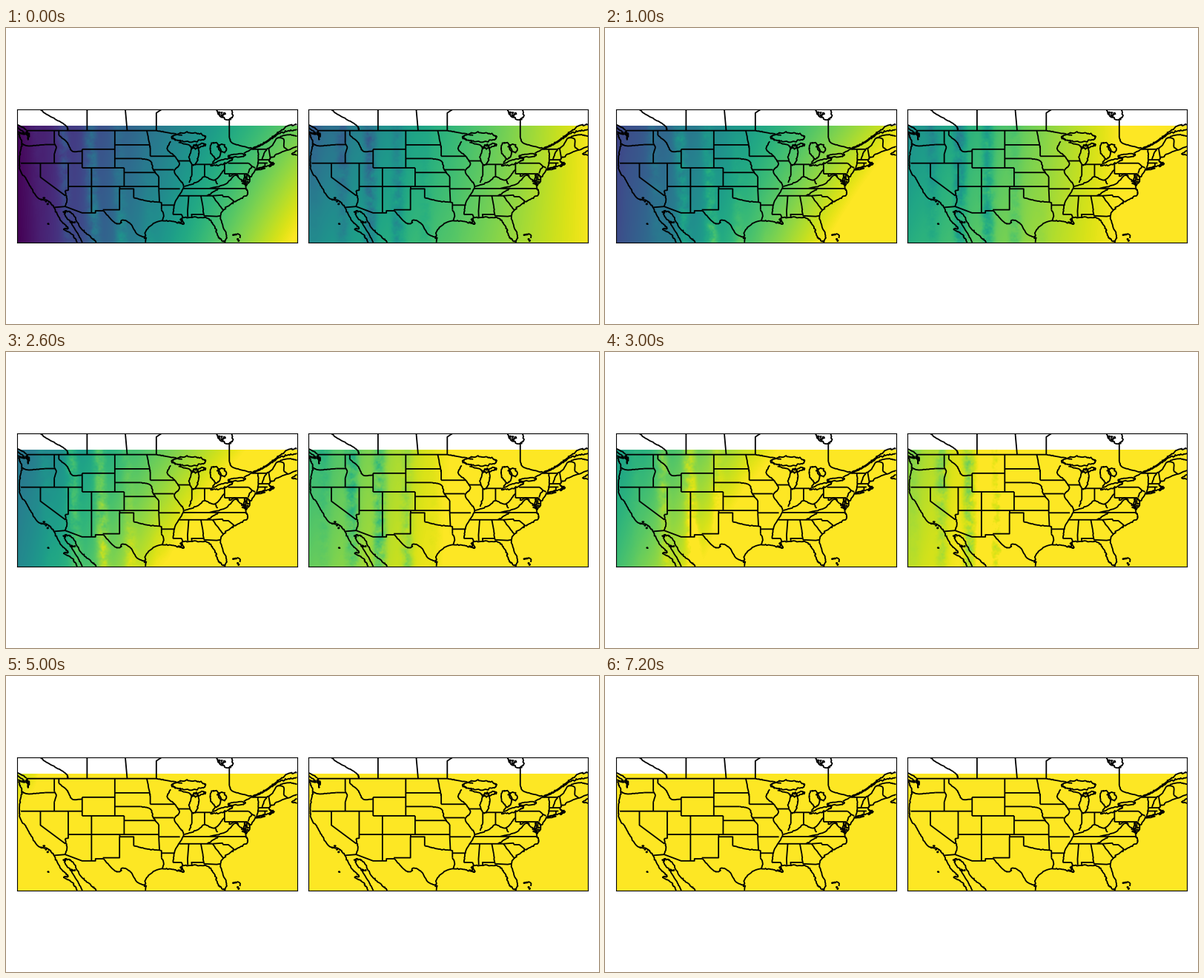
Write a matplotlib script that moves like this. It is 800 px wide and 400 px high and loops after 8 s.

```python
import numpy as np
import matplotlib.pyplot as plt
from matplotlib.animation import FuncAnimation
from matplotlib.collections import LineCollection

W, H, DPI = 800, 400, 100
WEST, EAST, SOUTH, NORTH, DATA_NORTH = -125, -65, 25, 53.5, 50
PANEL_W = 377.5
PANEL_H = PANEL_W * (NORTH - SOUTH) / (EAST - WEST)
rng = np.random.default_rng(4)
lines = []


def straight(*coords):
    lines.append(np.reshape(coords, (-1, 2)).astype(float))


def parallel(lat, west, east):
    straight(west, lat, east, lat)


def meridian(lon, north, south):
    straight(lon, north, lon, south)


def river(*coords, rough=0.05):
    """Smooth Hermite curve through a few lon/lat points, with random wiggles."""
    pts = np.reshape(coords, (-1, 2)).astype(float)
    slope = np.gradient(pts, axis=0)
    length = np.hypot(*np.diff(pts, axis=0).T).sum()
    u = np.linspace(0, len(pts) - 1, max(int(length / 0.22), 2 * len(pts)))
    i = np.minimum(u.astype(int), len(pts) - 2)
    f = (u - i)[:, None]
    path = (pts[i] * (1 + 2 * f) * (1 - f) ** 2 + pts[i + 1] * f ** 2 * (3 - 2 * f)
            + slope[i] * f * (1 - f) ** 2 - slope[i + 1] * f ** 2 * (1 - f))
    lines.append(path + rng.normal(0, rough, path.shape) * np.sin(np.pi * f))


def coast(*coords):
    river(*coords, rough=0.1)


def ring(lon, lat, a, b, tilt=0, rough=0.09):
    """Ragged ellipse for lakes and islands."""
    angle = np.linspace(0, 2 * np.pi, max(8, int(5 * (a + b) * 3)))
    x, y = a * np.cos(angle), b * np.sin(angle)
    c, s = np.cos(np.radians(tilt)), np.sin(np.radians(tilt))
    path = np.c_[lon + x * c - y * s, lat + x * s + y * c]
    path[1:-1] += rng.normal(0, rough, path[1:-1].shape)
    lines.append(path)


def islands(lon, lat, spread, count):
    for dx, dy in rng.normal(0, spread, (count, 2)):
        ring(lon + dx, lat + dy, 0.15, 0.08, rough=0.03)


# Coasts
coast(-123, 49, -122.4, 47.8, -122.7, 47.1, -122.9, 48.1, -124.7, 48.4)
coast(-124.7, 48.4, -124, 46.2, -124.5, 42.8, -124.3, 40.4, -122.5, 37.6, -120.6, 34.6,
      -118.4, 33.9, -117.1, 32.5, -115.8, 29.9, -114.1, 28.1, -115, 27.8, -113.2, 26.7,
      -112.1, 25)
coast(-111, 25, -112.7, 28, -114.7, 30.8, -114.5, 31.8, -113, 31, -111.3, 28,
      -109.4, 26.4, -108, 25)
coast(-97.5, 25, -97.3, 27.6, -94.7, 29.5, -91.5, 29.5, -89.3, 29, -89.6, 30.2,
      -86, 30.3, -84, 30.1, -82.7, 28.5, -82, 26.5, -80.8, 25.2, -80.1, 26.5,
      -81.4, 30.7, -79.2, 33.2, -77.8, 34, -75.6, 35.3, -76, 36.9)
coast(-76, 36.9, -76.4, 38.5, -76.2, 39.4, -75.9, 38, -75.8, 37.2, -75.1, 38.6,
      -75.5, 39.6, -74.9, 39, -74, 40.5)
coast(-74, 40.7, -71, 41.5, -70, 41.7, -70.1, 42, -70.8, 42.3, -70.7, 43.1, -69, 44.1,
      -67, 44.8, -65, 45.6)
coast(-65, 44.7, -66.1, 44, -65, 43.7)
coast(-74.5, 45.2, -71.2, 46.9, -69.5, 48.2, -67, 50, -65, 50.3)
coast(-74.5, 45, -71.2, 46.7, -69, 48.3, -67, 48.9, -65, 49.2)
coast(-82.2, 53.5, -81.6, 52.2, -79.8, 51.3, -78.8, 52, -79, 53.5)
coast(-125, 48.8, -123.4, 48.4, -125, 49.7)
coast(-123, 49.1, -123.6, 49.6, -125, 50.3)
ring(-72.9, 40.8, 1.05, 0.15, 10, 0.04)
ring(-78.3, 26.65, 0.5, 0.06, 5, 0.03)
river(-77.8, 26.9, -77.2, 26.5, -77.2, 25.9)
islands(-122.8, 48.3, 0.25, 6)
islands(-119, 33.7, 0.5, 3)
islands(-118.3, 29, 0, 1)
islands(-112.9, 29.1, 0.3, 3)
islands(-77.6, 25.1, 0.4, 4)
islands(-76.2, 37.8, 0.35, 6)
islands(-89.8, 29.6, 0.3, 5)
islands(-81, 52.6, 0.4, 8)
islands(-70.6, 41.5, 0.2, 3)

# Great Lakes
ring(-88.2, 47.6, 3.6, 0.95)
ring(-87, 43.8, 0.95, 2.2, -8)
ring(-86, 45.7, 1.4, 0.35, 15)
ring(-82.5, 44.8, 1.1, 1.7, 15)
ring(-81, 45.2, 1, 0.7, -35)
ring(-81.1, 42.2, 2.4, 0.42, 17)
ring(-77.9, 43.6, 1.8, 0.33, 4)
river(-83.1, 42.1, -82.45, 43)

# International borders and provinces
parallel(49, -123, -95.15)
parallel(45, -74.7, -71.5)
meridian(-110, 53.5, 49)
meridian(-79.5, 51.4, 47.5)
straight(-101.8, 53.5, -101.4, 49)
straight(-94.1, 53.5, -95.15, 52.8, -95.15, 49)
straight(-117.1, 32.5, -114.7, 32.7, -111.07, 31.33, -108.2, 31.33, -108.2, 31.78, -106.5, 31.78)
river(-120, 53.5, -118.5, 52.4, -114.7, 50.2, -114.07, 49)
river(-79.5, 47.5, -78.8, 46.3, -76, 45.5, -74.5, 45.1)
river(-95.15, 49, -92.9, 48.6, -89.6, 48)
river(-76.4, 44.1, -74.7, 45)
river(-71.5, 45, -70.3, 45.8, -69.2, 47.4, -67.8, 47.1, -67.8, 45.6, -67, 44.85)
river(-69.2, 47.4, -67, 48.1, -65, 47.8)
river(-106.5, 31.8, -104.4, 29.5, -103, 29, -102.4, 29.8, -100.6, 28.9, -99.3, 26.8, -97.2, 25.9)

# State lines surveyed along parallels and meridians
parallel(46, -119, -116.9)
parallel(42, -124.2, -111.05)
parallel(37, -114.04, -94.62)
parallel(41, -111.05, -102.05)
parallel(45, -111.05, -104.05)
parallel(45.94, -104.05, -96.55)
parallel(43, -104.05, -98.5)
parallel(40, -102.05, -95.3)
parallel(43.5, -96.45, -91.2)
parallel(40.6, -95.8, -91.4)
parallel(36.5, -94.62, -90.1)
parallel(33, -94.04, -91.15)
parallel(31, -91.6, -89.7)
parallel(35, -90.3, -83.1)
parallel(36.55, -89.5, -75.9)
parallel(42.5, -90.65, -87.8)
parallel(41.74, -86.8, -83.45)
parallel(39.72, -80.52, -75.6)
parallel(42, -79.76, -75.35)
parallel(42.03, -73.5, -71.3)
parallel(42.73, -73.27, -70.9)
meridian(-117.03, 49, 46.3)
meridian(-117.03, 44, 42)
meridian(-116.05, 49, 48)
meridian(-111.05, 45, 41)
meridian(-109.05, 41, 31.33)
meridian(-104.05, 49, 41)
meridian(-102.05, 41, 37)
meridian(-96.45, 45.3, 43.5)
meridian(-94.62, 39.1, 36.5)
meridian(-87.53, 41.7, 39.4)
meridian(-84.8, 41.74, 39.1)
meridian(-80.52, 42, 39.72)
meridian(-71.85, 42.03, 41.3)
straight(-120, 42, -120, 39, -114.63, 35)
straight(-114.04, 42, -114.04, 36.2, -114.7, 36.1)
straight(-103, 37, -103, 36.5, -100, 36.5, -100, 34.56)
straight(-103.04, 36.5, -103.04, 32, -106.62, 32)
straight(-94.62, 36.5, -94.48, 33.64, -94.04, 33.5, -94.04, 32)
straight(-88.2, 35, -88.45, 31.7, -88.4, 30.4)
straight(-85.6, 35, -85.2, 32.87)
straight(-87.5, 30.3, -87.6, 31, -85, 31, -84.86, 30.7, -82.2, 30.57, -81.45, 30.7)
straight(-83.1, 35, -81, 35.15, -80.8, 34.82, -79.7, 34.8, -78.55, 33.87)
straight(-75.79, 39.72, -75.7, 38.46, -75.05, 38.45)
straight(-74.7, 41.36, -73.95, 41)
straight(-71.08, 45.3, -70.7, 43.08)

# State lines along rivers and ridges
river(-124, 46.2, -122.6, 45.7, -119, 46)
river(-117, 46.3, -116.6, 45.4, -117.03, 44)
river(-116.05, 48, -114.4, 46.6, -113.8, 45.5, -113, 44.5, -111.05, 44.6)
river(-114.7, 36.1, -114.3, 34.2, -114.7, 32.7)
river(-100, 34.56, -97.2, 33.9, -94.48, 33.64)
river(-94.04, 32, -93.6, 31, -93.85, 29.7)
river(-97.2, 49, -96.6, 46, -96.45, 45.3)
river(-98.5, 43, -96.45, 42.5, -95.8, 40.6, -94.6, 39.1)
river(-92.1, 46.7, -92.8, 45, -91.2, 43.5, -90.2, 41.8, -91.3, 40.3, -90.2, 38.5,
      -89.3, 36.8, -91.1, 33.7, -91.6, 31)
river(-89.15, 37, -86.3, 38, -84.8, 39.1, -82.6, 38.4, -80.6, 40.6)
river(-88.1, 37.8, -87.53, 39.4)
river(-89.7, 31, -89.55, 30.2)
river(-85.2, 32.87, -85, 31)
river(-83.1, 35, -81.9, 33.4, -80.9, 32)
river(-84.3, 35, -83.1, 35.75, -81.7, 36.6)
river(-83.7, 36.6, -80.3, 37.5, -78.3, 39.4, -77.2, 38.6, -76.3, 38)
river(-82.6, 38.4, -82, 37.5)
river(-79.48, 39.72, -79.4, 39.2, -78.3, 39.7, -77.5, 39.2)
river(-90.4, 46.5, -88.1, 45.9, -87.6, 45.1)
river(-75.35, 42, -74.7, 41.3, -75.2, 40.6, -75.4, 39.8)
river(-73.35, 45, -73.3, 42.7, -73.6, 41)
river(-72.46, 42.73, -72, 44.2, -71.5, 45)

# Field grid: px is the distance from the panel's left edge, t runs south to north
px, t = np.meshgrid(np.linspace(0, PANEL_W, 378), np.linspace(0, 1, 158))


def smooth_noise(reach):
    kernel = np.hanning(reach + 2)
    noise = rng.normal(size=px.shape)
    for axis in (0, 1):
        noise = np.apply_along_axis(np.convolve, axis, noise, kernel, "same")
    return noise / noise.std()


texture = np.clip(0.85 + 0.2 * smooth_noise(16) + 0.12 * smooth_noise(4), 0.2, 1.4)


def stripes(phase, k, centre, width):
    """Terrain bands 38 px apart that drift west by a third of that per step."""
    wave = (0.5 + 0.5 * np.cos(2 * np.pi * (px - phase + 38 * k / 3) / 38)) ** 2
    return wave * texture * np.exp(-((px - centre) / width) ** 2)


def left_field(k):
    base = 0.02 * t + px * (0.0027 - 0.0007 * t) + k * (0.23 - 0.05 * t)
    return base + 0.13 * stripes(66 - 6 * t, k, 120 - 35 * t, 50)


def right_field(k):
    base = 0.48 + 0.00134 * px - 0.16 * t * (1 - px / PANEL_W) + k * (0.14 + 0.03 * t)
    return base - 0.15 * stripes(45, k, 98 - 25 * t, 55)


fig = plt.figure(figsize=(W / DPI, H / DPI), dpi=DPI, facecolor="white")


def panel(x, field):
    ax = fig.add_axes([x / W, (H - PANEL_H) / 2 / H, PANEL_W / W, PANEL_H / H])
    image = ax.imshow(field(0), extent=(WEST, EAST, SOUTH, DATA_NORTH), origin="lower",
                      cmap="viridis", vmin=0, vmax=1, aspect="auto")
    borders = LineCollection(lines, colors="black", linewidths=1.3, snap=False)
    ax.add_collection(borders, autolim=False)
    ax.set(xlim=(WEST, EAST), ylim=(SOUTH, NORTH), xticks=[], yticks=[])
    return image, field


panels = [panel(15, left_field), panel(407.5, right_field)]


def update(frame):
    for image, field in panels:
        image.set_data(field(min(frame, 6)))
    return [image for image, _ in panels]


anim = FuncAnimation(fig, update, frames=8, interval=1000, repeat=True, repeat_delay=0)
plt.show()
```
